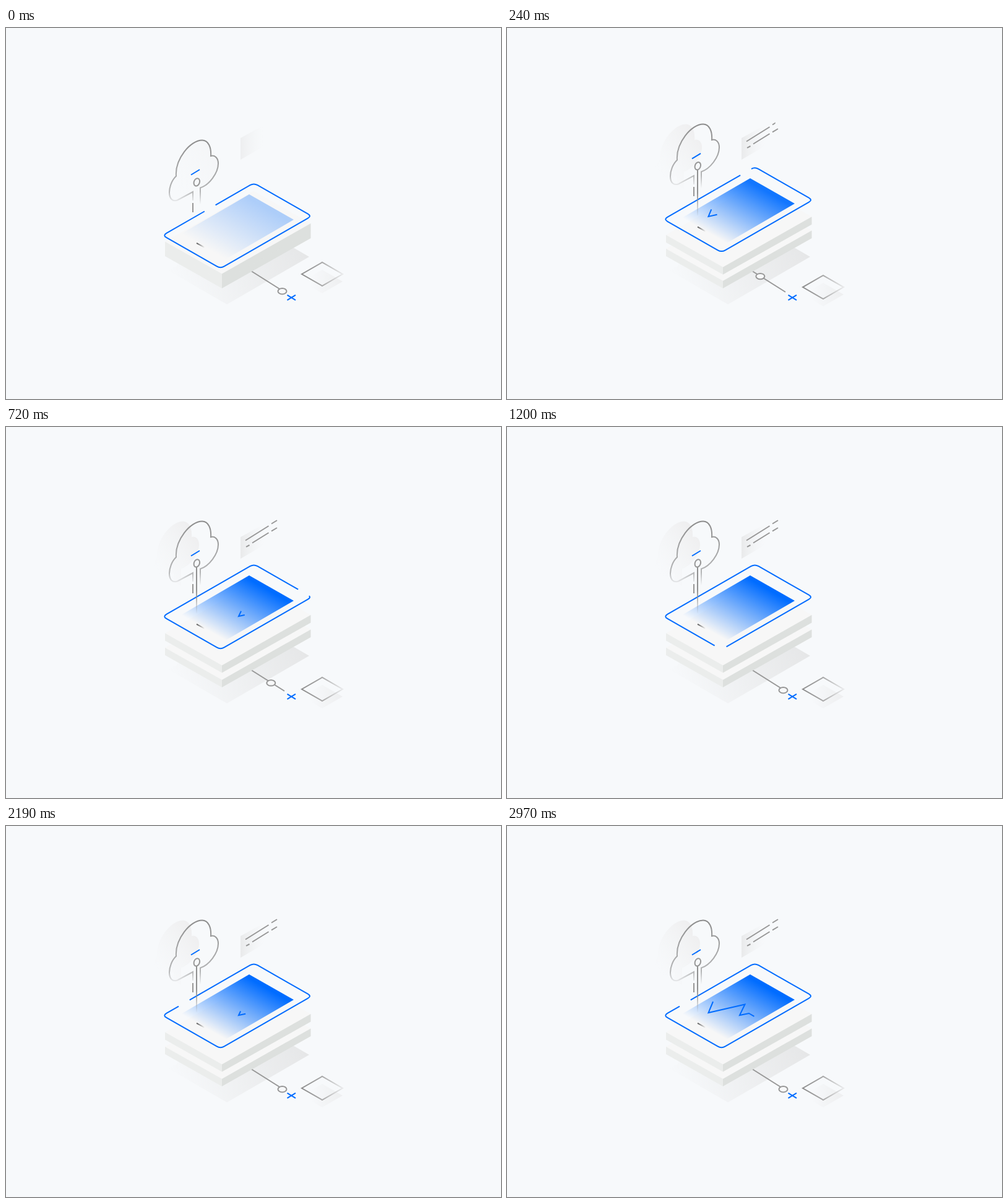
Write an HTML page that moves like this. It is 800 by 600 pixels and loops after 3 s.

```html
<!DOCTYPE html>
<html lang="en">
<head>
<meta charset="utf-8">
<title>Isometric tablet</title>
<style>
html, body { margin: 0; width: 100%; height: 100%; overflow: hidden; background: #f7f9fb; }
svg { display: block; }
.line { fill: none; stroke: #979797; stroke-width: 2; }
.blue { fill: none; stroke: #006cff; stroke-width: 2; }
</style>
</head>
<body>
<svg width="800" height="600" viewBox="0 0 800 600">
  <defs>
    <linearGradient id="screenFill">
      <stop offset="0" stop-color="#006cff" stop-opacity="0"/>
      <stop offset=".95" stop-color="#006cff"/>
    </linearGradient>
    <linearGradient id="groundFill" gradientUnits="userSpaceOnUse" x1="280" y1="440" x2="480" y2="360">
      <stop offset="0" stop-color="#e6e7e8" stop-opacity="0"/>
      <stop offset="1" stop-color="#e6e7e8"/>
    </linearGradient>
    <linearGradient id="cardFill">
      <stop offset="0" stop-color="#e9eaeb"/>
      <stop offset="1" stop-color="#f2f3f4" stop-opacity="0"/>
    </linearGradient>
    <linearGradient id="cloudLine" gradientUnits="userSpaceOnUse" x1="0" y1="152" x2="0" y2="256">
      <stop offset="0" stop-color="#8c8c8c"/>
      <stop offset=".8" stop-color="#b4b5b6"/>
      <stop offset="1" stop-color="#b4b5b6" stop-opacity="0"/>
    </linearGradient>
    <linearGradient id="cloudFill" gradientUnits="userSpaceOnUse" x1="335" y1="175" x2="268" y2="222">
      <stop offset="0" stop-color="#efeff0"/>
      <stop offset="1" stop-color="#f3f4f5" stop-opacity="0"/>
    </linearGradient>
    <linearGradient id="stemLine" gradientUnits="userSpaceOnUse" x1="0" y1="226" x2="0" y2="302">
      <stop offset=".5" stop-color="#8f8f8f"/>
      <stop offset="1" stop-color="#8f8f8f" stop-opacity="0"/>
    </linearGradient>
    <linearGradient id="buttonLine" gradientUnits="userSpaceOnUse" x1="308" y1="0" x2="321" y2="0">
      <stop offset=".1" stop-color="#666"/>
      <stop offset="1" stop-color="#666" stop-opacity="0"/>
    </linearGradient>
    <linearGradient id="tileLine">
      <stop offset="0" stop-color="#8c8c8c"/>
      <stop offset=".5" stop-color="#a8a8a8"/>
      <stop offset="1" stop-color="#e9eaeb"/>
    </linearGradient>
    <linearGradient id="tileFill">
      <stop offset=".2" stop-color="#eeeff0" stop-opacity="0"/>
      <stop offset="1" stop-color="#eeeff0"/>
    </linearGradient>
    <clipPath id="clipA"><rect id="wipeA" x="386" y="140" height="80"/></clipPath>
    <clipPath id="clipB"><rect id="wipeB" x="387" y="140" height="80"/></clipPath>
    <path id="cloud" d="M314 257V229.5C328 225 343 206 343 190C343 182 338 176 331 178C332 164 327 152.5 317 152.5C298 152.5 273 183 275 210.500C268 217 264 228 264 237C264 247 269 252 277 249.500L302 236V250"/>
    <g id="slab">
      <path fill="#f7f7f7" d="M257 357L400 275L492.500 327.500L349 409Z"/>
      <path fill="#ebedec" d="M257 357L349 409V421L257 369Z"/>
      <path fill="#dde0de" d="M492.500 327.500L349 409V421L492.500 340Z"/>
    </g>
  </defs>

  <path fill="url(#groundFill)" d="M398 317L490 370L357 447L262 392Z"/>
  <path class="line" d="M397 393.500L450 427"/>
  <ellipse id="dot" class="line" style="fill:#f8f9fa" rx="7" ry="4.700"/>
  <path class="blue" d="M454.500 431.800L468 440.200M468 431.800L454.500 440.200"/>

  <g id="tile">
    <path fill="url(#tileFill)" d="M478 436L511 417L544 436L511 455Z"/>
    <path class="line" style="stroke:url(#tileLine)" d="M478 424L511 405L544 424L511 443Z"/>
  </g>

  <use href="#slab"/>
  <use id="upper" href="#slab"/>

  <path id="card" fill="url(#cardFill)" d="M379 178L417 157V191L379 213Z"/>
  <path class="line" clip-path="url(#clipA)" d="M387 183.500L424.500 160M429 156.500L438 151"/>
  <path class="line" clip-path="url(#clipB)" d="M388 193.800L393.500 191M398 187.500L424.500 171M429 168.300L438 163"/>

  <g id="lift">
    <use id="shade" href="#cloud" fill="url(#cloudFill)"/>
    <rect id="screen" width="1" height="1" fill="url(#screenFill)" transform="matrix(110 -64 72 41 283 304)"/>
    <path style="stroke:url(#buttonLine)" class="line" d="M308 318.800L321 326"/>
    <path id="rim" class="blue"/>
    <path id="chart" class="blue" d="M333 284L325.500 302L384.500 288.500L376 306L391 303L399.500 308"/>
    <use href="#cloud" class="line" style="stroke:url(#cloudLine)"/>
    <path class="line" d="M302 254V269"/>
    <path id="stem" class="line" style="stroke:url(#stemLine)"/>
    <ellipse class="line" rx="4.500" ry="6.300" transform="translate(308.300 220.300) rotate(20)"/>
    <path class="blue" d="M299 208.500L313 200"/>
  </g>
</svg>
<script>
const LOOP = 3000, GAP = 20.5;
const $ = id => document.getElementById(id);
const set = (id, name, value) => $(id).setAttribute(name, value);
const clamp = u => Math.min(1, Math.max(0, u));
const mix = (a, b, p) => a + (b - a) * p;
const smooth = u => (u = clamp(u), u * u * (3 - 2 * u));
const sineOut = u => Math.sin(clamp(u) * Math.PI / 2);

// Closed polygon with corners cut at distance d and rounded.
function roundedPath(points, d) {
  const toward = ([x, y], [u, v]) => {
    const k = d / Math.hypot(u - x, v - y);
    return [mix(x, u, k), mix(y, v, k)];
  };
  const n = points.length;
  const parts = points.map((p, i) => {
    const next = points[(i + 1) % n], after = points[(i + 2) % n];
    return `${i ? '' : 'M' + toward(p, next)}L${toward(next, p)}Q${next} ${toward(next, after)}`;
  });
  return parts.join('') + 'Z';
}

set('rim', 'd', roundedPath([[253.2, 306.4], [400.5, 221.7], [494, 275.2], [346.7, 359.9]], 7));
const rimLength = $('rim').getTotalLength();
const chartLength = $('chart').getTotalLength();

// Time and distance of the opening in the rim.
const rimKeys = [[0, 81], [240, 146], [300, 158], [540, 198], [720, 254],
  [1080, 373], [1200, 435.5], [1560, rimLength + 33]];

function track(keys, t) {
  const i = keys.findIndex(k => k[0] > t);
  if (i < 0) return keys[keys.length - 1][1];
  const [t0, a] = keys[i - 1], [t1, b] = keys[i];
  return mix(a, b, (t - t0) / (t1 - t0));
}

// Visible span of the chart: two running passes, then a full draw.
function chartSpan(t) {
  if (t >= 2690) return [0, smooth((t - 2690) / 285)];
  const u = t < 1455 ? t : t - 1455;
  return [sineOut((u - 205) / 1000), sineOut((u - 75) / 947)];
}

function draw(t) {
  const rise = smooth(t / 300);
  set('lift', 'transform', `translate(0 ${29 * (1 - rise)})`);
  set('upper', 'transform', `translate(0 ${mix(-11.5, -23.5, rise)})`);
  set('shade', 'transform', `translate(${-31 * rise} 0)`);
  set('shade', 'opacity', mix(.3, 1, rise));
  set('screen', 'opacity', mix(.3, 1, rise));
  set('card', 'opacity', mix(.7, 1, rise));

  const drop = smooth(1 - (1 - clamp(t / 600)) ** 2.5);
  set('tile', 'transform', `translate(0 ${-26 * (1 - drop)})`);

  const slide = t < 300 ? rise : 1 - smooth((t - 300) / 780);
  set('dot', 'transform', `translate(${446.5 - 41.3 * slide} ${425.7 - 26.8 * slide})`);

  set('wipeA', 'width', 53 * rise);
  set('wipeB', 'width', 52 * smooth(t / 255));
  set('stem', 'd', `M308 226.500V${226.5 + 75.5 * smooth(t / 265)}`);

  set('rim', 'stroke-dasharray', `${rimLength - GAP} ${GAP}`);
  set('rim', 'stroke-dashoffset', -(track(rimKeys, t) + GAP / 2));

  const [tail, head] = chartSpan(t).map(p => p * chartLength);
  const span = Math.max(0, head - tail);
  set('chart', 'visibility', span > .1 ? 'visible' : 'hidden');
  set('chart', 'stroke-dasharray', `0 ${tail} ${span} 999`);
}

const start = performance.now();
function tick() {
  draw((performance.now() - start) % LOOP);
  requestAnimationFrame(tick);
}
draw(0);
requestAnimationFrame(tick);
</script>
</body>
</html>
```
